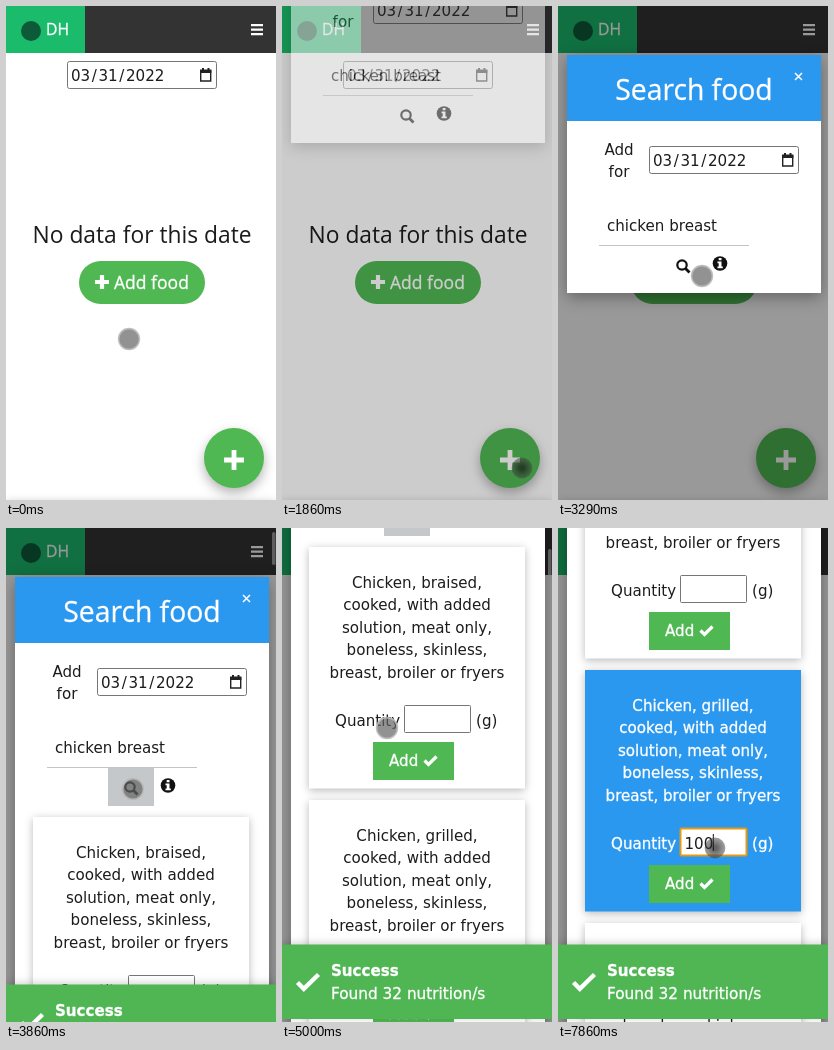
Animation of 270x494 px, one loop 8 s. Source, as an HTML page:

```html
<!DOCTYPE html>
<html lang="en">
<head>
<meta charset="utf-8">
<title>Food diary</title>
<style>
  html, body { margin: 0; width: 100%; height: 100%; overflow: hidden; background: #fff; }
  svg { display: block; width: 100%; height: 100%; }
  text { font: 15.1px "DejaVu Sans", sans-serif; fill: #1c1c1c; }
  .head { font-family: "Open Sans", sans-serif; }
  .mid { text-anchor: middle; }
  .white { fill: #fff; }
  text.white, .active text { fill: #fff; stroke: #fff; stroke-width: .3; }
  .green { fill: #50b853; }
  .field { fill: #fff; stroke: #767676; }
  .active + .field { stroke: #e59a16; stroke-width: 2; }
  .stroke { fill: none; stroke: #fff; }
  .card { filter: drop-shadow(0 2px 4px rgba(0, 0, 0, .28)); }
  .fab { filter: drop-shadow(0 5px 6px rgba(0, 0, 0, .3)); }
  .panel { filter: drop-shadow(0 4px 8px rgba(0, 0, 0, .35)); }
  .toast { filter: drop-shadow(0 -1px 4px rgba(0, 0, 0, .2)); }
</style>
</head>
<body>
<svg viewBox="0 0 270 494" preserveAspectRatio="none">
  <defs>
    <g id="date">
      <rect class="field" x="61.5" y="55.5" width="149" height="27" rx="2"/>
      <text x="65" y="75" dx="0 0 1.6 1.6 0 1.6 1.6">03/31/2022</text>
      <path d="M194.700 65h10v10h-10z" fill="none" stroke="#222" stroke-width="1.400"/>
      <path d="M194 63.500h11.400v3.500h-11.400zM196 62h2v2h-2zM201.500 62h2v2h-2z" fill="#222"/>
    </g>
    <path id="tick" d="M1.500 5.500l4 4L13.500 1.500" fill="none" stroke="#fff" stroke-width="3.200"/>
    <radialGradient id="touch">
      <stop offset=".2" stop-color="#141414" stop-opacity=".66"/>
      <stop offset="1" stop-color="#444" stop-opacity=".5"/>
    </radialGradient>
  </defs>

  <rect width="270" height="494" fill="#fff"/>
  <rect width="270" height="47" fill="#333"/>
  <rect width="79" height="47" fill="#1bbb6c"/>
  <circle cx="25" cy="25" r="10" fill="#0c5a38"/>
  <text class="head white" x="40" y="29" style="font-size:15.7px">DH</text>
  <path class="stroke" d="M245 19.200h12M245 23.700h12M245 28.200h12" stroke-width="2.300"/>
  <use href="#date"/>
  <text class="head mid" x="136" y="237" style="font-size:22.8px">No data for this date</text>
  <rect class="green" x="73" y="255" width="126" height="43" rx="21.500"/>
  <path class="stroke" d="M89 276h14M96 269v14" stroke-width="4.200"/>
  <text class="head white" x="108" y="283" style="font-size:17.5px">Add food</text>
  <circle class="green fab" cx="228" cy="452" r="30"/>
  <path class="stroke" d="M218 454h20M228 444v20" stroke-width="4.800"/>

  <rect id="backdrop" width="270" height="494"/>
  <g id="modal">
    <rect id="panel" class="white panel" x="9" y="49" width="254" height="238"/>
    <rect x="9" y="49" width="254" height="66" fill="#2b98f0"/>
    <text class="head white mid" x="136" y="94" style="font-size:28.300px">Search food</text>
    <path class="stroke" d="M237 67l7 7M244 67l-7 7" stroke-width="1.500"/>
    <text class="mid" x="61" y="149">Add</text>
    <text class="mid" x="61" y="171">for</text>
    <use href="#date" x="30" y="85"/>
    <text x="49" y="225">chicken breast</text>
    <path d="M41 239.500h150" stroke="#c4c4c4"/>
    <rect id="pressed" x="102" y="240" width="46" height="38" fill="#c5c8ca"/>
    <circle cx="124" cy="259" r="4.700" fill="none" stroke="#111" stroke-width="2.200"/>
    <path d="M127.500 262.500l4 4" stroke="#111" stroke-width="2.800"/>
    <circle cx="162" cy="257.500" r="7.300" fill="#111"/>
    <path class="white" d="M160.700 252h2.800v2.300h-2.800zM159.500 255.500h4v5h1.300v1.800h-5.300v-1.800h1.200v-3.200h-1.200z"/>
    <g id="cards"></g>
  </g>
  <rect id="thumb" x="266" width="3.500" height="33" rx="1.700" fill="#888" fill-opacity=".6"/>

  <g id="toast">
    <rect class="toast" y="416.500" width="270" height="74.500" fill="#50b553"/>
    <path class="stroke" d="M15.500 454.500l6.300 6.300L36.500 446.500" stroke-width="4.400"/>
    <text class="white" x="49" y="448" style="font-weight:bold">Success</text>
    <text class="white" x="49" y="471" style="font-size:15.3px">Found 32 nutrition/s</text>
  </g>
  <circle id="pointer" r="10.400" stroke-width="1.600"/>
</svg>

<script>
const $ = id => document.getElementById(id);
const set = (id, attrs) => {
  for (const name in attrs) $(id).setAttribute(name, attrs[name]);
};
const show = (id, on) => set(id, { visibility: on ? 'visible' : 'hidden' });

const STEPS_PER_SECOND = 7, LOOP = 8000;
const CARD_TOP = 289, CARD_PITCH = 253;

const cardMarkup = (method, i) => {
  const lines = [`Chicken, ${method},`, 'cooked, with added', 'solution, meat only,',
    'boneless, skinless,', 'breast, broiler or fryers'];
  return `<g transform="translate(0 ${CARD_TOP + i * CARD_PITCH})">
    <rect id="face${i}" class="card" x="27" width="216" height="241.500" fill="#fff"/>
    <g id="copy${i}">
      ${lines.map((s, n) => `<text class="mid" x="135" y="${40.5 + n * 22.5}">${s}</text>`).join('')}
      <text x="53" y="179">Quantity</text><text x="194" y="179">(g)</text>
    </g>
    <rect class="field" x="122.500" y="158.500" width="66" height="27" rx="1"/>
    <text id="amount${i}" x="126.500" y="179"></text>
    <path id="caret${i}" stroke="#111" visibility="hidden"/>
    <rect class="green" x="91" y="195" width="81" height="38"/>
    <text class="white" x="107" y="219">Add</text>
    <use href="#tick" x="141" y="208"/>
  </g>`;
};
$('cards').innerHTML = ['braised', 'grilled', 'roasted'].map(cardMarkup).join('');

// Each row: step, then values; linear between rows.
const pointerTrack = [[0, 123, 333], [7, 240, 462], [16, 240, 462], [23, 144, 270],
  [25, 127, 261], [27, 127, 261], [31, 84, 326], [35, 105, 200], [39, 130, 275],
  [41, 133, 283], [43, 133, 283], [47, 157, 320]];
const scrollTrack = [[31, 0], [33, 120], [35, 270], [37, 360], [39, 400]];
const modalTrack = [[12, -300, 0], [13, -150, .5], [14, -30, .9], [15, 0, 1]];
const toastTrack = [[26, 80], [28, 0]];
const presses = [[7, 16], [25, 26], [31, 35], [47, 56]];

function sample(track, step) {
  const next = track.findIndex(row => row[0] > step);
  if (next === 0) return track[0].slice(1);
  if (next < 0) return track[track.length - 1].slice(1);
  const a = track[next - 1], b = track[next];
  const k = (step - a[0]) / (b[0] - a[0]);
  return a.slice(1).map((v, i) => v + (b[i + 1] - v) * k);
}

function draw(step) {
  const [scroll] = sample(scrollTrack, step);
  const [drop, opacity] = sample(modalTrack, step);
  const results = step >= 27;
  set('backdrop', { 'fill-opacity': .4 * opacity });
  set('modal', { transform: `translate(0 ${drop - scroll})`, opacity });
  set('panel', { height: results ? 1100 : 238 });
  show('pressed', step >= 25);
  show('cards', results);
  show('thumb', results && step < 45);
  set('thumb', { y: 4 + scroll / 16 });
  set('toast', { transform: `translate(0 ${sample(toastTrack, step)[0]})` });

  const active = step >= 47;
  const typed = '100'.slice(0, Math.max(0, step - 52));
  set('face1', { fill: active ? '#2b98f0' : '#fff' });
  set('copy1', { class: active ? 'active' : '' });
  $('amount1').textContent = typed;
  set('caret1', { d: `M${126.5 + typed.length * 9.6} 164v17` });
  show('caret1', active);

  const [cx, cy] = sample(pointerTrack, step);
  const down = presses.some(([from, to]) => step >= from && step < to);
  set('pointer', {
    cx, cy,
    fill: down ? 'url(#touch)' : 'rgba(100,100,100,.7)',
    stroke: down ? 'none' : 'rgba(185,185,185,.9)'
  });
}

function tick(now) {
  const t = now % LOOP;
  draw(Math.floor(t * STEPS_PER_SECOND / 1000 + .03));
  requestAnimationFrame(tick);
}
draw(0);
requestAnimationFrame(tick);
</script>
</body>
</html>
```
